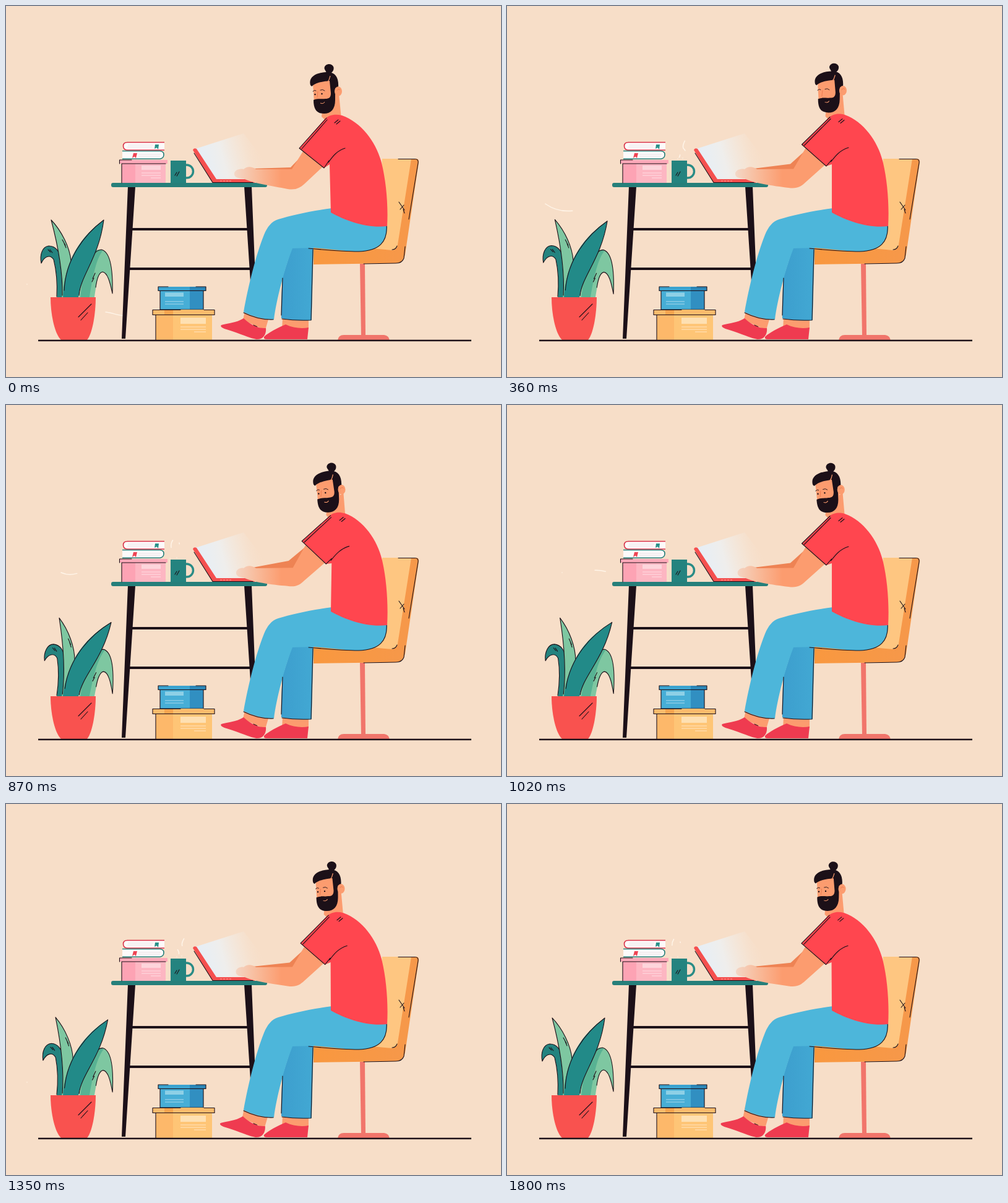
These frames come from a looping animation (800x600 px, 1.83 s). An HTML page:

```html
<!DOCTYPE html>
<html lang="en">
<head>
<meta charset="utf-8">
<title>Working at the desk</title>
<style>
html, body { margin: 0; width: 100%; height: 100%; overflow: hidden; background: #f7dec8; }
svg { display: block; width: 800px; height: 600px; }
.ink { fill: none; stroke: #1c1018; stroke-width: 1.1; stroke-linecap: round; stroke-linejoin: round; }
.skin { fill: #fc9c6f; }
.dark { fill: #1c1018; }
.air { fill: none; stroke: #fff5e9; stroke-width: 1.5; stroke-linecap: round; }
.pale { fill: none; stroke: #fff; stroke-opacity: .55; stroke-width: 1; }
</style>
</head>
<body>
<svg viewBox="0 0 800 600">
  <defs>
    <linearGradient id="screen" gradientUnits="userSpaceOnUse" x1="318" y1="262" x2="416" y2="236">
      <stop offset="0" stop-color="#e6eef6"/>
      <stop offset=".35" stop-color="#efeeec"/>
      <stop offset=".68" stop-color="#f5e5d6" stop-opacity=".85"/>
      <stop offset="1" stop-color="#f7dec8" stop-opacity="0"/>
    </linearGradient>
    <linearGradient id="hand" gradientUnits="userSpaceOnUse" x1="368" y1="0" x2="445" y2="0">
      <stop offset="0" stop-color="#f3d8c8"/>
      <stop offset=".45" stop-color="#f8bd9e"/>
      <stop offset="1" stop-color="#fc9c6f"/>
    </linearGradient>
    <linearGradient id="calf" gradientUnits="userSpaceOnUse" x1="448" y1="0" x2="496" y2="0">
      <stop offset="0" stop-color="#3d9fce"/>
      <stop offset="1" stop-color="#42a8d3"/>
    </linearGradient>
    <linearGradient id="seat" gradientUnits="userSpaceOnUse" x1="497" y1="0" x2="645" y2="0">
      <stop offset="0" stop-color="#f9983f"/>
      <stop offset="1" stop-color="#f6984a"/>
    </linearGradient>
  </defs>
  <rect width="800" height="600" fill="#f7dec8"/>

  <g id="wind">
    <path class="air" d="M34 450C49 458 62 461 78 457C108 450 122 492 160 495C172 496 178 500 191 501"/>
    <path class="air" d="M62 320C78 331 92 333 107 331C125 328 134 318 149 323C160 328 170 332 185 332"/>
    <path class="air" d="M89 271C98 275 107 275 116 272C134 267 148 265 165 271"/>
  </g>

  <!-- chair -->
  <path d="M608 247H656L636 396H596Z" fill="#fec681"/>
  <path d="M655 247H662Q668 247 667 253L645 402Q642 416 630 416L497 418V390H570L624 395Q632 394 633 386Z" fill="url(#seat)"/>
  <path d="M572 417H580L581 533H574Z" fill="#f1756b"/>
  <path d="M536 541Q537 532 546 532H611Q619 533 620 541Z" fill="#f1756b"/>
  <path class="ink" d="M634 247.500H660Q667 247 666 254L651 345M624 394Q630 394 632 388M645 389L643 408Q640 416 630 416L578 417M635 317L644 330M637 329L643 322M642 329L644 335"/>

  <!-- desk -->
  <g class="dark">
    <path d="M197 292H209L193 538H187ZM385 292H397L407 538H401Z"/>
    <path d="M203 359H390V363H203ZM199 423H397V427H199Z"/>
  </g>
  <rect x="170" y="286" width="252" height="7" rx="3" fill="#267f7a"/>

  <!-- books -->
  <path d="M256 221H196Q190 221 190 226.500T196 233H256Z" fill="#fdfafa"/>
  <path d="M256 220.500H196Q189.500 220.500 189.500 226.500T196 233H256" fill="none" stroke="#d93249" stroke-width="1.600"/>
  <path d="M241 224H247L246 232L243.500 229L240 231Z" fill="#2a9189"/>
  <path d="M188 235H249Q255 235 255 240.500T249 247H188Z" fill="#fdfafa"/>
  <path d="M188 234.500H249Q255 235 255 240.500T249 247.300H188" fill="none" stroke="#267f7a" stroke-width="1.600"/>
  <path d="M206 238H212L210 246L207.500 243.500L204 246Z" fill="#ef4454"/>
  <path d="M197 225H238M196 228H236M214 240H250M214 243H249" fill="none" stroke="#e4dee3" stroke-width=".8"/>

  <!-- pink box -->
  <path d="M187 255H258V286H187Z" fill="#fdb6c2"/>
  <path d="M187 255H209V286H187Z" fill="#fda3b4"/>
  <path d="M183 249H261V255H183Z" fill="#fda9b9"/>
  <path d="M219 258H250V265H219Z" fill="#fdd5db"/>
  <path class="pale" d="M219 270H250M219 274H250M234 278H250"/>
  <path class="ink" d="M183.500 255V249H203M187 286V255H258"/>

  <!-- mug -->
  <circle cx="292" cy="267.500" r="10.500" fill="none" stroke="#2a8c86" stroke-width="3.400"/>
  <path d="M266 250H291V286H266Z" fill="#24837f"/>
  <path class="ink" d="M273 274L276 269M276 275L280 268"/>
  <g id="steam">
    <path class="air" d="M284 246C292 238 288 233 285 230C283 225 286 221 288 217"/>
    <path class="air" d="M276 247C284 240 276 237 277 233C279 228 281 228 280 223"/>
    <path class="air" d="M265 248C267 242 273 240 269 235C265 230 267 222 270 218"/>
  </g>

  <!-- laptop -->
  <path d="M306 231L384 206L424 258L402 281H337Z" fill="url(#screen)"/>
  <path d="M302 233Q303 229 308 231L340 280H398Q402 281 402 286H334Z" fill="#f5504f"/>
  <path class="ink" d="M304 238L334 285.500H399"/>
  <path d="M346 283H364" stroke="#fba09a" stroke-dasharray="3 2"/>

  <!-- stacked boxes -->
  <path d="M249 461H319V491H249Z" fill="#47aed6"/>
  <path d="M297 461H319V491H297Z" fill="#318fc1"/>
  <path d="M246 454H323V461H246Z" fill="#3ba3d0"/>
  <path d="M297 454H323V461H297Z" fill="#2b86b7"/>
  <path d="M257 463.500H287V470H257Z" fill="#8ed0e6"/>
  <path class="pale" d="M257 478H287M257 482H287"/>
  <path class="ink" d="M307 454H323V460.500H246V454H262M249 461V491H319V461"/>
  <path d="M242 499H333V540H242Z" fill="#fec576"/>
  <path d="M242 499H270V540H242Z" fill="#fdb86a"/>
  <path d="M237 491H337V499H237Z" fill="#fdbb6c"/>
  <path d="M256 491H270V499H256Z" fill="#f7a44f"/>
  <path d="M282 504H323V514H282Z" fill="#fee0b2"/>
  <path class="pale" d="M282 519H323M282 523H323M304 527H323"/>
  <path class="ink" d="M320 491.500H337V499.500H237V491.500H282M242 500V540"/>

  <!-- plant -->
  <g id="leafL">
    <path d="M82 478C83 455 83 432 77 410C71 401 62 405 57 416C54 402 59 389 69 388C80 388 87 397 89 410C92 430 91 455 91 478Z" fill="#24837f"/>
    <path class="ink" d="M82 470C83 452 82 430 77 410C71 401 62 405 57 416C54 402 59 389 69 388C80 388 87 397 89 410M68 394L72 398M71 394L75 399"/>
  </g>
  <g id="leafTall">
    <path d="M73 346C90 364 103 390 105 412L107 478H90C93 440 85 390 73 346Z" fill="#7ec7a1"/>
    <path class="ink" d="M105 412C103 390 90 364 73 346C82 380 92 425 91 468M91 378L96 387M94 384L97 391"/>
  </g>
  <g id="leafR">
    <path d="M118 478C120 450 130 396 154 394C169 397 173 425 172 465C168 446 164 431 156 430C148 432 146 450 142 478Z" fill="#7ec7a1"/>
    <path d="M139 398C147 393 153 394 156 396C147 408 140 433 134 478H120C122 450 126 416 139 398Z" fill="#58b293"/>
    <path class="ink" d="M130 424C136 407 144 395 154 394C169 397 173 425 172 465C168 446 164 431 156 430C150 431 147 440 145 455M140 441L144 432M139 446L142 440"/>
  </g>
  <g id="leafDark">
    <path d="M158 346C124 370 92 410 92 478H117C117 438 149 412 158 346Z" fill="#228a88"/>
    <path class="ink" d="M94 460C96 410 126 370 158 346C150 408 120 436 118 468"/>
  </g>
  <path d="M72 471H145C145 500 139 531 131 540H89C79 531 72 500 72 471Z" fill="#f9524f"/>
  <path class="ink" d="M117 503L138 482M121 508L132 496"/>

  <!-- legs -->
  <path class="skin" d="M447 504H489V522L446 523Z"/>
  <path d="M417 535C424 528 440 520 452 515C464 521 478 522 489 520L487 539H421Q416 539 417 535Z" fill="#ef3b50"/>
  <g id="foot">
    <path class="skin" d="M387 488L426 500L419 524L383 508Z"/>
    <path d="M348 516C356 513 372 513 384 505C394 515 408 522 420 521C421 529 417 539 406 539C398 539 380 530 353 522C348 520 346 518 348 516Z" fill="#ef3b50"/>
  </g>
  <path d="M463 388H497L494 508Q468 510 445 505C444 480 446 455 447 438Z" fill="url(#calf)"/>
  <path d="M527 327C495 331 462 338 440 345C429 348 422 358 417 370C404 402 391 455 384 495Q408 507 433 507C437 475 450 425 463 392L497 391L560 397C598 400 618 383 616 352Z" fill="#4db6da"/>
  <path class="ink" d="M489 392C520 395 548 397 570 397C603 396 617 382 615 354M496 394L493 508Q468 509 446 506M384 496Q408 508 432 507M445 500L447 440"/>

  <!-- upper body -->
  <path id="backArm" fill="#ee8354"/>
  <path id="arm" fill="url(#hand)"/>
  <path id="neck" class="skin"/>
  <path id="shirt" fill="#ff464f"/>
  <path id="folds" class="ink"/>

  <g id="head">
    <path class="skin" d="M496 126L498 156L526 164L534 148V118L520 114Z"/>
    <path class="dark" d="M492 128C488 114 503 107 520 107C533 107 538 117 537 131L532 133V152C532 167 525 174 514 174C502 174 497 167 497 152C504 149 510 151 516 150C522 150 525 148 525 141L523 121C514 122 502 123 494 130Z"/>
    <path class="dark" d="M517 109C519 106 514.500 104 514.500 100C516 92.500 527 92 529.500 99C530.500 106 525 108 523 111Z"/>
    <ellipse class="skin" cx="537" cy="138" rx="6" ry="7.800"/>
    <path d="M535 137Q537 133 540 136" fill="none" stroke="#e9764b" stroke-width=".8"/>
    <path d="M519 124Q523 119 524 113" fill="none" stroke="#fc9c6f" stroke-width="1.200"/>
    <path d="M508 157Q513 159 515 155" fill="none" stroke="#fc9c6f" stroke-width="1"/>
    <path d="M504 138L503 148" fill="none" stroke="#e9764b" stroke-width=".8"/>
    <path class="ink" d="M496 138Q499 135 501 137M508 136Q512 134 515 137" style="stroke-width:.9"/>
    <g id="eyes" class="dark"><circle cx="499.500" cy="143" r="1.200"/><circle cx="510.500" cy="142" r="1.200"/></g>
  </g>

  <path d="M52 541H752" stroke="#1c1018" stroke-width="2.400"/>
</svg>
<script>
const LOOP = 1830, STEP = 30;
const el = id => document.getElementById(id);
const poses = [0, 360, 630, 870, 1200, 1500, 1800];
const motion = {
  lean:  [0, .5, 1, .82, .2, .65, .38],
  headX: [0, 5.5, 9.5, 7, 2, 7.5, 4],
  headY: [0, -1.5, -1, -.3, 0, -1.8, -1],
  tilt:  [0, .8, -.5, -2.6, -2, 1.3, 1],
  hand:  [0, 0, -6, 3, 3, 2, 1],
  foot:  [0, 0, -1, 0, -.5, -2, -1.8]
};

// Smooth curve through the poses
function at(name, t) {
  const v = motion[name], last = poses.length - 1;
  let i = 0;
  while (i < last - 1 && t > poses[i + 1]) i++;
  const slope = k => {
    const a = Math.max(k - 1, 0), b = Math.min(k + 1, last);
    return (v[b] - v[a]) / (poses[b] - poses[a]);
  };
  const d = poses[i + 1] - poses[i], u = (t - poses[i]) / d, w = 1 - u;
  return v[i] * (1 + 2 * u) * w * w + slope(i) * d * u * w * w
    + v[i + 1] * (3 - 2 * u) * u * u - slope(i + 1) * d * u * u * w;
}

function linear(t, keys, col) {
  if (t <= keys[0][0]) return keys[0][col];
  for (let i = 1; i < keys.length; i++) {
    const a = keys[i - 1], b = keys[i];
    if (t <= b[0]) return a[col] + (b[col] - a[col]) * (t - a[0]) / (b[0] - a[0]);
  }
  return keys[keys.length - 1][col];
}

// Each row: time, start and end of the visible part of the stroke
const windKeys = [
  [[1080, 0, 0], [1200, 0, .25], [1350, .3, .7], [1500, .82, 1], [1590, 1, 1]],
  [[250, 0, 0], [360, 0, .36], [500, .35, .8], [630, .7, 1], [720, 1, 1]],
  [[810, 0, 0], [870, 0, .34], [970, .4, .85], [1070, 1, 1]]
];
const steamKeys = [
  [[120, 0, 0], [285, .08, .88], [360, .42, .96], [585, .95, 1], [640, 1, 1]],
  [[240, 0, 0], [285, .06, .14], [360, .12, .28], [585, .42, .92], [630, .6, .95], [870, .94, 1], [910, 1, 1]],
  [[480, 0, 0], [585, .06, .38], [630, .08, .42], [760, .35, .9], [870, .6, .97], [885, .66, .97], [915, 1, 1]]
];

function trim(path, t, keys) {
  const a = linear(t, keys, 1), b = linear(t, keys, 2);
  path.style.display = b - a > .005 ? "" : "none";
  path.setAttribute("pathLength", 1);
  path.setAttribute("stroke-dasharray", `0 ${a} ${b - a} 2`);
}

const turn = (id, deg, x, y) => el(id).setAttribute("transform", `rotate(${deg} ${x} ${y})`);
const draw = (id, d) => el(id).setAttribute("d", d);

function body(t) {
  const b = at("lean", t), h = at("hand", t);
  const p = (x, y, dx = 0, dy = 0) => `${x + dx * b} ${y + dy * b} `;
  const cuff = p(474, 230, 5, -12), under = p(514, 262, 4, -6);
  draw("backArm", `M398 263L${p(460, 261, -4, -11)}L${p(482, 238, 4, -12)}L${p(500, 250)}L462 274L400 270Z`);
  draw("arm", `M${p(480, 235, 5, -10)}L${p(462, 264, 2, -1)}L404 264C396 258 388 260 384 264`
    + `C${376 + h} 262 ${368 + h} 267 ${369 + h} 272C${369 + h} 277 ${376 + h} 279 384 279`
    + `C396 286 430 291 ${p(455, 296, 0, -4)}C${p(469, 298, 0, -4)}${p(475, 294, 0, -4)}${p(482, 288, 0, -5)}L${p(512, 260, 4, -6)}Z`);
  draw("neck", `M${p(512, 160, 9)}L${p(510, 179, 9, -1)}L${p(522, 190, 8)}L${p(542, 182, 8)}L${p(538, 142, 9)}Z`);
  draw("shirt", `M${p(515, 183, 8, -3)}C${p(522, 176, 8, -3)}${p(532, 174, 7, -2)}${p(543, 177, 6, -2)}`
    + `C${p(574, 188, 5, -2)}${p(597, 219, 4)}${p(606, 250, 2)}C${p(614, 280, 1)}618 320 616 356`
    + `C585 360 550 348 525 334L${p(523, 256, 4)}L${under}L${cuff}Z`);
  draw("folds", `M${p(518, 181, 8, -3)}L${cuff}L${under}L${p(522, 250, 5, -2)}`
    + `M${p(519, 184, 8, -3)}L${p(478, 231, 5, -11)}`
    + `M${p(521, 253, 5, -2)}C${p(528, 243, 6, -2)}${p(535, 234, 7, -2)}${p(548, 230, 8, -2)}`
    + `M${p(531, 189, 10, -3)}L${p(537, 184, 10, -3)}M${p(534, 191, 10, -3)}L${p(540, 186, 10, -3)}`);
  el("head").setAttribute("transform",
    `translate(${at("headX", t)} ${at("headY", t)}) rotate(${at("tilt", t)} 516 170)`);
  el("foot").setAttribute("transform", `translate(${at("foot", t)} 0)`);
  el("eyes").style.display = t >= 300 && t <= 420 ? "none" : "";
}

function plant(t) {
  const sway = (1 - Math.cos(2 * Math.PI * t / LOOP)) / 2;
  turn("leafL", 5.5 * sway, 85, 470);
  turn("leafTall", 6 * sway, 95, 470);
  turn("leafDark", 5.700 * sway, 108, 470);
  turn("leafR", 2.500 * sway, 130, 470);
}

const wind = [...el("wind").children], steam = [...el("steam").children];
let origin;
function frame(now) {
  origin ??= now;
  const t = Math.floor(((now - origin) % LOOP) / STEP) * STEP;
  body(t);
  plant(t);
  // The first gust trails over the loop's start
  wind.forEach((line, i) => trim(line, i === 0 && t < 100 ? t + 1500 : t, windKeys[i]));
  steam.forEach((line, i) => trim(line, t % (LOOP / 2), steamKeys[i]));
  requestAnimationFrame(frame);
}
requestAnimationFrame(frame);
</script>
</body>
</html>
```
